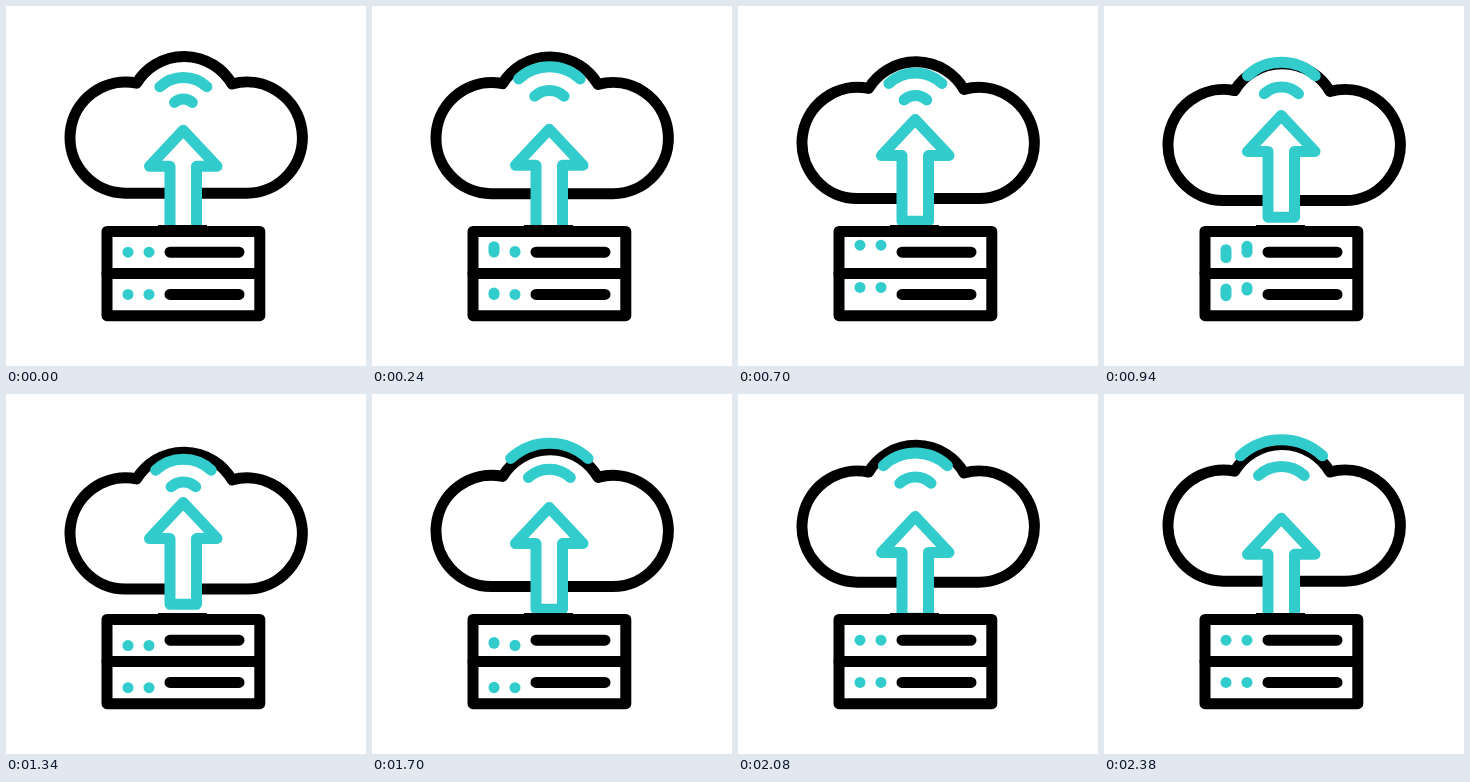
Write an HTML page that moves like this. It is 360 px wide and 360 px high and loops after 2400 ms.

```html
<!DOCTYPE html>
<html lang="en">
<head>
<meta charset="utf-8">
<title>Cloud upload</title>
<style>
  html, body { margin: 0; width: 100%; height: 100%; overflow: hidden; background: #fff; }
  svg { display: block; width: 100%; height: 100%; }
  .line { fill: none; stroke: #000; stroke-width: 11; stroke-linecap: round; stroke-linejoin: round; }
  .teal { stroke: #33cccc; }
  .solid { fill: #fff; }
</style>
</head>
<body>
<svg viewBox="0 0 360 360">
  <path id="cloud" class="line solid" d="M119.3 187.2H240.5A55.6 55.6 0 1 0 226 78A55.5 55.5 0 0 0 130.6 77.1A55.6 55.6 0 1 0 119.3 187.2Z"/>
  <path id="inner" class="line teal"/>
  <path id="outer" class="line teal"/>
  <path id="arrow" class="line teal solid" d="M177.2 124.3L211 160.3H190.5V226H164V160.3H143.5Z"/>
  <rect x="152" y="219" width="49" height="2"/>
  <rect class="line solid" x="101" y="225.5" width="152.8" height="84.2"/>
  <path class="line" d="M101 267.5H253.5M164 246.2H233M164 288.4H233"/>
  <g id="dots"></g>
</svg>
<script>
const LOOP = 2400, PULSE = 600;
const $ = id => document.getElementById(id);
const clamp = x => Math.min(1, Math.max(0, x));
const smooth = x => x * x * (3 - 2 * x);
const ramp = (t, from, to) => smooth(clamp((t - from) / (to - from)));

const ease = p => p < 0.5
  ? Math.pow(2 * p, 2.3) / 2
  : 1 - Math.pow(2 - 2 * p, 2.3) / 2;

// x, y, delay
const dots = [[122, 246.2, 0], [143, 246.2, 100], [122, 288.4, 85], [143, 288.4, 155]]
  .map(([x, y, delay]) => {
    const el = document.createElementNS("http://www.w3.org/2000/svg", "path");
    el.setAttribute("class", "line teal");
    $("dots").append(el);
    return { el, x, y, delay };
  });

function arc(el, r) {
  const a = 43 * Math.PI / 180, cx = 177.4, cy = 106;
  const dx = r * Math.sin(a), y = cy - r * Math.cos(a);
  el.setAttribute("d", `M${cx - dx} ${y}A${r} ${r} 0 0 1 ${cx + dx} ${y}`);
}

// Each end of a dot hops up, drops below its rest place, then returns.
const hop = (t, up, down, back) =>
  -7 * ramp(t, ...up) + 12.3 * ramp(t, ...down) - 5.3 * ramp(t, ...back);

function drawDot({ el, x, y, delay }, time) {
  const t = time - delay;
  const top = y + hop(t, [100, 300], [760, 1200], [1580, 1800]);
  const bottom = y + hop(t, [220, 440], [720, 940], [1600, 1830]);
  el.setAttribute("d", `M${x} ${top}V${bottom + 0.01}`);
}

function draw(t) {
  const lift = ease(1 - Math.abs(1 - 2 * t / LOOP));
  $("cloud").setAttribute("transform", `translate(0 ${8 * lift})`);
  $("arrow").setAttribute("transform", `translate(0 ${-16 * lift})`);
  const u = t % PULSE / PULSE;
  arc($("inner"), 13 + 21.2 * u);
  arc($("outer"), 34.4 + 26.8 * u);
  dots.forEach(dot => drawDot(dot, t));
}

function frame() {
  draw(performance.now() % LOOP);
  requestAnimationFrame(frame);
}
frame();
</script>
</body>
</html>
```
